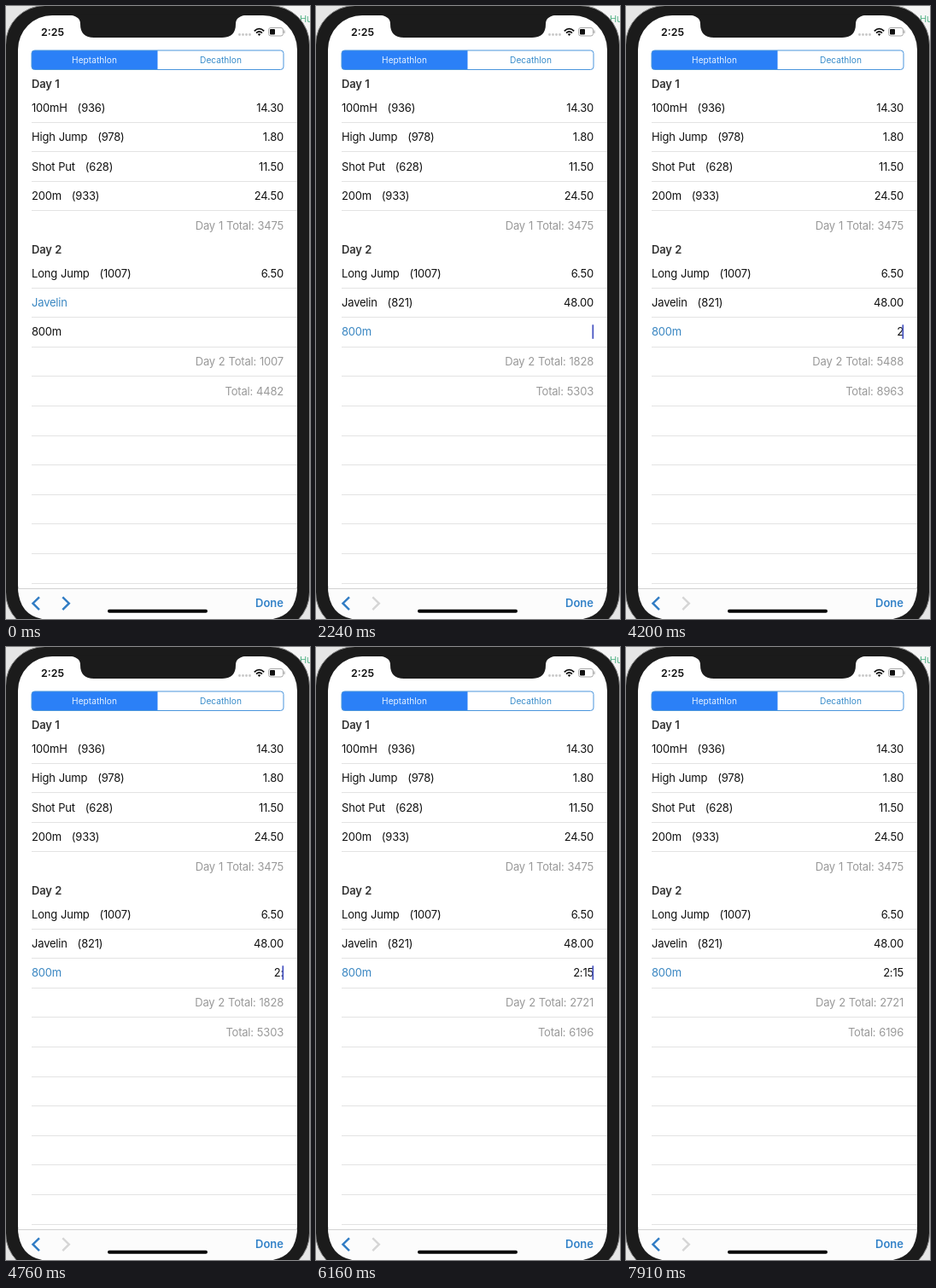
An HTML page that plays this animation: 356x718 px, repeating every 8000 ms.

```html
<!DOCTYPE html>
<html lang="en">
<head>
<meta charset="utf-8">
<title>Heptathlon score entry</title>
<style>
html, body { margin: 0; width: 100%; height: 100%; overflow: hidden; background: #e6e6e6; }
svg { display: block; width: 356px; height: 718px; }
text { font: 13px Inter, "Open Sans", sans-serif; letter-spacing: -0.2px; word-spacing: 0.5px; white-space: pre; fill: #111; }
.end { text-anchor: end; }
.mid { text-anchor: middle; }
.total { fill: #999; }
.head { font-weight: 600; fill: #333; }
.tab { font-size: 10.2px; letter-spacing: 0; }
.clock { font-size: 12.4px; font-weight: 600; letter-spacing: 0; }
.done { font-weight: 600; fill: #3382c8; letter-spacing: 0; }
.chevron { fill: none; stroke: #327dc4; stroke-width: 2.5; }
</style>
</head>
<body>
<svg viewBox="0 0 356 718">
  <rect width="356" height="718" fill="#e6e6e6"/>
  <rect x="326" width="30" height="50" fill="#f6f6f6"/>
  <text x="344" y="19" style="font-size:11px;fill:#58b48a">Hu</text>
  <rect x="-.5" y="-.5" width="356" height="733" rx="46" fill="#1b1b1b" stroke="#8b8b8b"/>
  <rect x="14" y="11" width="327" height="708" rx="40" fill="#fff"/>
  <path d="M72 10.5Q87 11 87 21Q87 37 103 37H253Q269 37 269 21Q269 11 284 10.5Z" fill="#1b1b1b"/>

  <text class="clock" x="41" y="35">2:25</text>
  <g fill="#c8c8c8">
    <circle cx="273.5" cy="33.5" r="1.4"/><circle cx="277.5" cy="33.5" r="1.4"/>
    <circle cx="281.5" cy="33.5" r="1.4"/><circle cx="285.5" cy="33.5" r="1.4"/>
  </g>
  <g fill="none" stroke="#111" stroke-width="1.8">
    <path d="M290.8 29.3Q296.5 24 302.2 29.3M293 31.6Q296.5 28.4 300 31.6"/>
    <path d="M296.5 35L294.7 33Q296.5 31.6 298.3 33Z" fill="#111" stroke="none"/>
  </g>
  <rect x="307.5" y="25.5" width="17" height="9.5" rx="2.5" fill="none" stroke="#aaa"/>
  <rect x="309" y="27" width="6" height="6.5" rx="1" fill="#111"/>
  <path d="M326 28.5V32" stroke="#aaa" stroke-width="1.2"/>

  <path d="M177.5 52H33.5Q30 52 30 55.5V71Q30 74.5 33.5 74.5H177.5Z" fill="#2b80f7"/>
  <rect x="30" y="52" width="295" height="22.5" rx="3.5" fill="none" stroke="#4a95dc"/>
  <text class="tab mid" x="103.5" y="67.2" style="fill:#e6f1ff">Heptathlon</text>
  <text class="tab mid" x="251.5" y="67.2" style="fill:#388cca">Decathlon</text>

  <g id="table"></g>
  <rect id="caret" x="323.4" width="1.8" height="16.5" fill="#4a57c2"/>

  <path d="M14 682.5H341Q339 719 301 719H54Q16 719 14 682.5Z" fill="#fcfcfc"/>
  <path d="M14 682.5H341" stroke="#d2d2d2"/>
  <path class="chevron" d="M39 692.3L31.5 699.7L39 707.1"/>
  <path class="chevron" id="next" d="M66.3 692.3L73.8 699.7L66.3 707.1"/>
  <text class="done end" x="325" y="704.4">Done</text>
  <rect x="119" y="706.7" width="117" height="4" rx="2" fill="#050505"/>
</svg>
<script>
const LOOP = 8000, DAY_1 = 3475, LONG_JUMP = 1007;
const table = document.getElementById("table");
const caret = document.getElementById("caret");
const next = document.getElementById("next");

function add(tag, attrs, content = "") {
  const node = document.createElementNS("http://www.w3.org/2000/svg", tag);
  for (const name in attrs) node.setAttribute(name, attrs[name]);
  node.textContent = content;
  return table.appendChild(node);
}
const label = (y, content, type = "") => add("text", { x: 30, y: y + 4.7, class: type }, content);
const value = (y, content, type = "") => add("text", { x: 325, y: y + 4.7, class: "end " + type }, content);
const rule = y => add("path", { d: `M30 ${y}H341`, stroke: "#e3e3e3" });

[136.5, 170.5, 205.5, 239.5].forEach(rule);
for (let i = 0; i < 11; i++) rule(Math.floor(330 + i * 34.6) + 0.5);

label(91.5, "Day 1", "head");
[["100mH   (936)", "14.30"], ["High Jump   (978)", "1.80"],
 ["Shot Put   (628)", "11.50"], ["200m   (933)", "24.50"]].forEach(([name, mark], i) => {
  label(119 + i * 34.4, name);
  value(119 + i * 34.4, mark);
});
value(257, "Day 1 Total: " + DAY_1, "total");
label(285.5, "Day 2", "head");
label(313, "Long Jump   (1007)");
value(313, "6.50");
const javelin = { label: label(347.5, ""), value: value(347.5, "") };
const run = { label: label(381.7, "800m"), value: value(381.7, "") };
const dayTotal = value(416.5, "", "total"), grandTotal = value(451, "", "total");

// time, active row, javelin mark, 800m mark, points from both
const entries = [
  [0, 0, "", "", 0],
  [980, 0, "4", "", 2],
  [1120, 0, "48", "", 821],
  [2100, 1, "48.00", "", 821],
  [4130, 1, "48.00", "2", 4481],
  [4760, 1, "48.00", "2:", 821],
  [4970, 1, "48.00", "2:1", 1922],
  [6160, 1, "48.00", "2:15", 1714]
];

// time, caret opacity; linear in between
const blink = [
  [0, 0], [20, 0], [200, 1], [520, 1], [760, 0], [979, 0], [980, 1],
  [1570, 1], [1830, 0], [2099, 0], [2100, 1], [2690, 1], [2930, 0],
  [3170, 0], [3350, 1], [3810, 1], [4010, 0], [4129, 0], [4130, 1],
  [4600, 1], [4759, 0.5], [4760, 1], [5430, 1], [5670, 0], [5900, 0],
  [6080, 1], [6680, 1], [6920, 0], [7110, 0], [7290, 1], [7660, 1], [7900, 0], [LOOP, 0]
];

function caretOpacity(t) {
  const i = blink.findIndex(([time]) => time > t);
  const [t0, a] = blink[i - 1], [t1, b] = blink[i];
  return a + (b - a) * (t - t0) / (t1 - t0);
}

function draw(t) {
  const [, row, throwMark, runMark, points] = entries.filter(([time]) => time <= t).pop();
  javelin.label.textContent = row ? "Javelin   (821)" : "Javelin";
  javelin.value.textContent = throwMark;
  run.value.textContent = runMark;
  javelin.label.style.fill = row ? "" : "#3a87c2";
  run.label.style.fill = row ? "#3a87c2" : "";
  dayTotal.textContent = "Day 2 Total: " + (LONG_JUMP + points);
  grandTotal.textContent = "Total: " + (DAY_1 + LONG_JUMP + points);
  next.style.stroke = row ? "#d6d6d6" : "";
  caret.setAttribute("y", row ? 373.3 : 339.3);
  caret.setAttribute("opacity", caretOpacity(t));
}

const start = performance.now();
function frame() {
  draw((performance.now() - start) % LOOP);
  requestAnimationFrame(frame);
}
frame();
</script>
</body>
</html>
```
